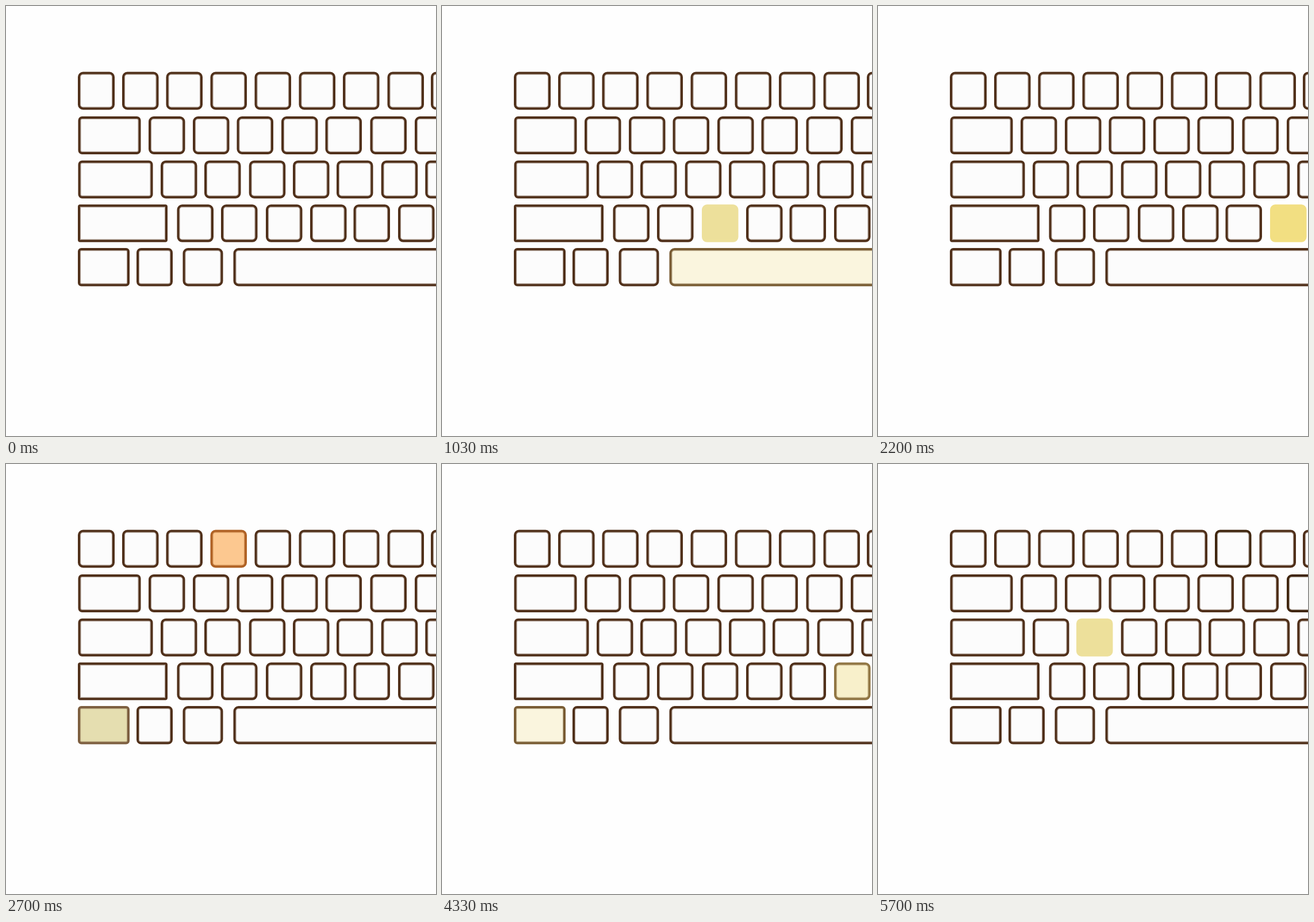
Write an HTML page with a canvas that moves like this. It is 748 by 748 pixels and loops after 6.01 s.

```html
<!DOCTYPE html>
<html lang="en">
<head>
<meta charset="utf-8">
<title>Keyboard</title>
<style>
  html, body { margin: 0; width: 100%; height: 100%; overflow: hidden; background: #fefefe; }
  canvas { display: block; }
</style>
</head>
<body>
<canvas id="stage" width="748" height="748"></canvas>
<script>
const ctx = document.getElementById('stage').getContext('2d');
const LOOP = 6010, CYCLE = 2000, STEP = 50;
const FACE = '#fcfcfc', EDGE = '#50301a', DARK = '#40260f';
const YELLOW = '#f2df82', PALE = '#ede09b', ORANGE = '#fbbd7c';

// Each row: top, height, wide first key [x, width], then the left edges of the square keys.
const rows = [
  [114.5, 66, [125, 64], [202, 278.5, 355.5, 432.5, 509.5, 586, 663.5, 739]],
  [192, 66, [125.5, 109], [248, 325, 401.5, 479, 555.5, 633.5, 711]],
  [268.7, 66, [125.5, 130], [269, 345, 422.7, 499, 575, 652.7, 729.3]],
  [345.3, 65.5, [125, 156], [297.5, 374, 452, 529, 604.5, 682]],
];
const keys = {};
rows.forEach(([y, h, [x, w], lefts], r) => {
  keys[r + '-0'] = { x, y, w, h, radius: r === 3 ? 4 : r ? 7 : 9 };
  lefts.forEach((left, i) => keys[r + '-' + (i + 1)] = { x: left, y, w: 63.5, h, radius: 9 });
});
[[125, 90, 6], [227, 63, 8], [307.5, 70, 9], [395.5, 380, 9]].forEach(([x, w, radius], i) =>
  keys['4-' + i] = { x, y: 421, w, h: 66.5, radius });

// Poses of a pressed key: [step, face, edge].
const press = (start, peak, end, color, after = EDGE) =>
  [[start, FACE, EDGE], [peak, color, color], [end, FACE, after]];
const presses = {
  '3-6': press(0, 4, 9, YELLOW),
  '4-0': [[6, FACE, EDGE], [10, YELLOW, YELLOW], [14, '#e5deb0', '#7d5f40'], [16, FACE, EDGE]],
  '0-3': [[7, FACE, EDGE], [11, ORANGE, ORANGE], [14, '#fcc890', '#b06225'], [17, FACE, EDGE]],
  '4-3': press(14, 18, 22, YELLOW),
  '3-3': [[15, FACE, EDGE], [18, FACE, '#24140a'], [21, PALE, PALE], [25, FACE, DARK]],
  '0-6': press(21, 24, 28, PALE, DARK),
  '1-7': press(24, 27, 30, PALE, DARK),
  '2-2': [[26, FACE, EDGE], [30, '#f4ebba', '#16120a'], [34, PALE, PALE]],
};

const channels = hex => [1, 3, 5].map(i => parseInt(hex.slice(i, i + 2), 16));
function mix(a, b, k) {
  const to = channels(b);
  return 'rgb(' + channels(a).map((v, i) => Math.round(v + (to[i] - v) * k)) + ')';
}

function poseAt(poses, step) {
  if (!poses || step <= poses[0][0]) return [FACE, EDGE];
  const next = poses.findIndex(p => p[0] > step);
  if (next < 0) return poses[poses.length - 1].slice(1);
  const a = poses[next - 1], b = poses[next];
  const k = (step - a[0]) / (b[0] - a[0]);
  return [mix(a[1], b[1], k), mix(a[2], b[2], k)];
}

function outline({ x, y, w, h, radius }, inset, width) {
  ctx.beginPath();
  ctx.roundRect(x + inset, y + inset, w - 2 * inset, h - 2 * inset, Math.max(1, radius - inset));
  ctx.lineWidth = width;
}

function drawKey(key, [face, edge]) {
  outline(key, 2, 4);
  ctx.fillStyle = face;
  ctx.strokeStyle = edge;
  ctx.fill();
  ctx.stroke();
  // soft inner side of the border
  outline(key, 4.5, 1.4);
  ctx.globalAlpha = 0.4;
  ctx.stroke();
  ctx.globalAlpha = 1;
}

function render(now) {
  const t = now % LOOP;
  const phase = t < 3 * CYCLE ? t % CYCLE : CYCLE;
  const step = Math.min(34, Math.floor((phase + 20) / STEP));
  ctx.fillStyle = '#fefefe';
  ctx.fillRect(0, 0, 748, 748);
  for (const id in keys) drawKey(keys[id], poseAt(presses[id], step));
}

const start = performance.now();
function tick() {
  render(performance.now() - start);
  requestAnimationFrame(tick);
}
tick();
</script>
</body>
</html>
```
